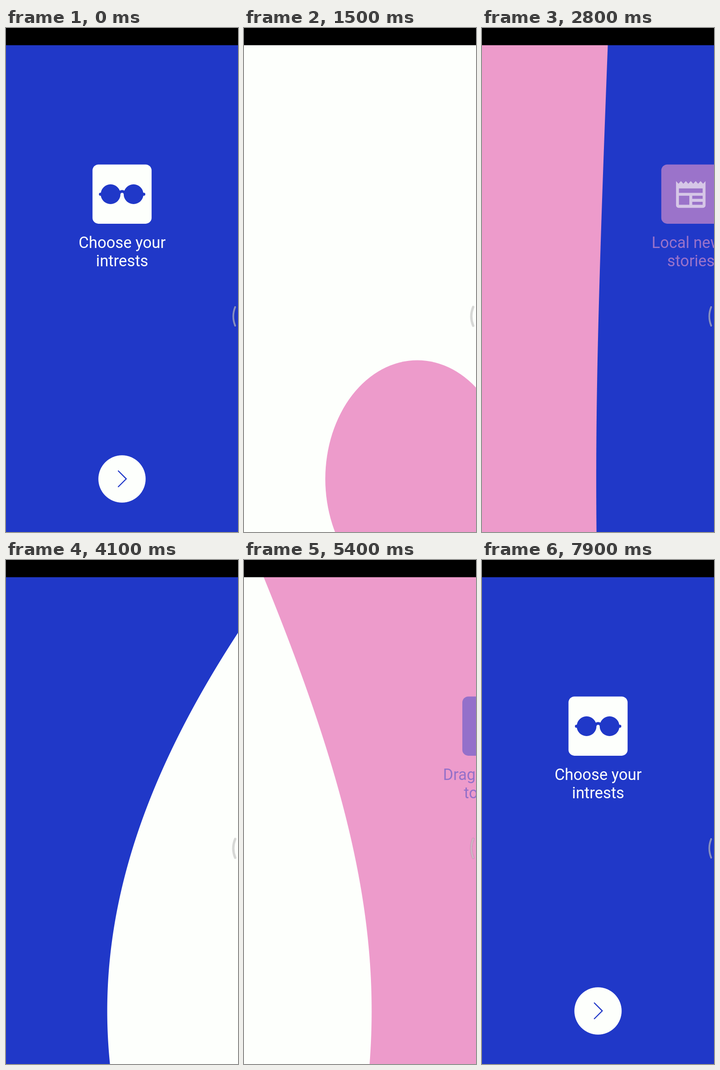
Write an HTML page with a canvas that moves like this. It is 508 px wide and 1102 px high and loops after 8000 ms.

```html
<!DOCTYPE html>
<html lang="en">
<head>
<meta charset="utf-8">
<title>Onboarding pages</title>
<style>
  html, body { margin: 0; width: 100%; height: 100%; overflow: hidden; background: #000; }
  canvas { display: block; }
</style>
</head>
<body>
<canvas id="stage" width="508" height="1102"></canvas>
<script>
const ctx = document.getElementById('stage').getContext('2d');
const W = 508, H = 1102, LOOP = 8000, STEP = 100;
const DP = 1.2937;                 // stage pixels per layout unit
const BUTTON = { x: 254, y: 986, r: 40 * DP };
const CAMERA = 200 * DP;           // perspective distance of the turning disc
const DISC_MS = 270, TEXT_MS = 216;

const BLUE = [32, 56, 200], WHITE = [253, 255, 252], PINK = [237, 155, 203];
const pages = [
  { bg: BLUE, lines: ['Choose your', 'intrests'], icon: glasses },
  { bg: WHITE, lines: ['Local news', 'stories'], icon: newspaper },
  { bg: PINK, lines: ['Drag and drop', 'to move'], icon: moveArrows },
];
const page = i => pages[i % 3];

// Start of the disc and of the text slide for each page change.
const changes = [
  [140, 150], [1402.5, 1412], [2666.4, 2678.4],
  [3978, 3988], [5255, 5260.7], [6367.5, 6383.1],
];

const clamp = v => Math.min(1, Math.max(0, v));
const rgb = c => `rgb(${c.map(Math.round)})`;
const mix = (a, b, k) => a.map((v, i) => v + (b[i] - v) * k);

// cubic-bezier(.42, 0, 1, 1)
function easeIn(x) {
  let lo = 0, hi = 1;
  for (let i = 0; i < 30; i++) {
    const u = (lo + hi) / 2, v = 1 - u;
    if (1.26 * v * v * u + 3 * v * u * u + u ** 3 < x) lo = u; else hi = u;
  }
  return lo * lo * (3 - 2 * lo);
}
function easeInOut(x) {
  if (x <= 0 || x >= 1) return clamp(x);
  return x < .5 ? easeIn(2 * x) / 2 : 1 - easeIn(2 - 2 * x) / 2;
}

// A disc that turns half a circle about its vertical axis while growing
// six times and back, seen in perspective: an ellipse, or a hyperbola close up.
function disc(p, color) {
  const angle = Math.PI * p, c = Math.cos(angle), n = Math.sin(angle);
  const a = BUTTON.r * (1 + 10 * Math.min(p, 1 - p));
  const q = 1 - (a * n / CAMERA) ** 2, m = a * a * n / CAMERA;
  ctx.fillStyle = color;
  ctx.beginPath();
  if (q > .1) {
    ctx.ellipse(BUTTON.x + c * m / q, BUTTON.y, Math.abs(a * c / q), a / Math.sqrt(q), 0, 0, 7);
  } else {
    const far = c > 0 ? W + 10 : -10;
    ctx.moveTo(far, H + 8);
    for (let y = H + 8; y >= 0; y -= 4) {
      const e = (y - BUTTON.y) ** 2 - a * a;
      ctx.lineTo(BUTTON.x + c * e / (m + Math.sqrt(Math.max(0, m * m - q * e))), y);
    }
    ctx.lineTo(far, 0);
  }
  ctx.fill();
}

function polyline(points) {
  points.forEach(([x, y], i) => i ? ctx.lineTo(x, y) : ctx.moveTo(x, y));
}

// Icons are drawn about the middle of the tile.
function glasses() {
  ctx.beginPath();
  for (const x of [-25, 25.3]) {
    ctx.moveTo(x, 0);
    ctx.arc(x, 0, 21.6, 0, 7);
  }
  ctx.roundRect(-50.5, -3.2, 9, 6.6, 3);
  ctx.roundRect(42, -3.2, 9, 6.6, 3);
  ctx.fill();
  ctx.lineWidth = 6;
  ctx.beginPath();
  ctx.moveTo(-6, -1);
  ctx.bezierCurveTo(-5, -8, 5.5, -8, 6.5, -1);
  ctx.stroke();
}

function newspaper() {
  ctx.beginPath();
  const teeth = [];
  for (let i = 0; i <= 12; i++) teeth.push([-32.3 + i * 5.38, i % 2 ? -23 : -28.6]);
  polyline(teeth);
  ctx.arcTo(32.3, 29.8, 0, 29.8, 5.5);
  ctx.arcTo(-32.3, 29.8, -32.3, 0, 5.5);
  ctx.closePath();
  ctx.rect(-26, -12.6, 52, 9.8);
  ctx.rect(-26, 3.4, 22.8, 19.6);
  ctx.rect(3.2, 3.4, 22.8, 6.6);
  ctx.rect(3.2, 16.6, 22.8, 6.4);
  ctx.fill('evenodd');
}

function moveArrows() {
  ctx.save();
  for (let i = 0; i < 4; i++) {
    ctx.beginPath();
    polyline([[0, -31], [11, -20], [3, -20], [3, 0], [-3, 0], [-3, -20], [-11, -20]]);
    ctx.fill();
    ctx.rotate(Math.PI / 2);
  }
  ctx.restore();
}

function card(i, x) {
  const { bg, lines, icon } = page(i), ink = rgb(page(i + 1).bg);
  ctx.fillStyle = ink;
  ctx.beginPath();
  ctx.roundRect(x - 64.6, 298.5, 129.4, 129.4, 13);
  ctx.fill();
  lines.forEach((line, k) => ctx.fillText(line, x + .3, 480.6 + 40.1 * k));
  ctx.save();
  ctx.translate(x, 363.4);
  ctx.fillStyle = ctx.strokeStyle = rgb(bg);
  icon();
  ctx.restore();
}

// Cards lie two widths apart and fade out halfway between each other.
function cards(slide) {
  ctx.font = '34.25px Roboto, sans-serif';
  ctx.textAlign = 'center';
  ctx.globalAlpha = Math.abs(1 - 2 * (slide % 1));
  pages.forEach((_, i) => {
    const x = W / 2 + (i - slide) * 2 * W;
    if (x > -120 && x < W + 120) card(i, x);
  });
  ctx.globalAlpha = 1;
}

function chevron(p, color) {
  ctx.globalAlpha = clamp(Math.max(1 - p / .05, (p - .9) / .1));
  ctx.strokeStyle = color;
  ctx.lineWidth = 2.4;
  ctx.lineCap = 'round';
  ctx.beginPath();
  polyline([[246, 968.5], [263.3, 985.8], [246, 1003]]);
  ctx.stroke();
  ctx.lineCap = 'butt';
  ctx.globalAlpha = 1;
}

function edgeHandle() {
  ctx.lineCap = 'round';
  for (const [width, color] of [[5.8, 'rgba(0,0,0,.1)'], [4, 'rgba(205,205,205,.6)']]) {
    ctx.lineWidth = width;
    ctx.strokeStyle = color;
    ctx.beginPath();
    ctx.moveTo(501.8, 610);
    ctx.quadraticCurveTo(493.6, 630.5, 501.8, 651);
    ctx.stroke();
  }
  ctx.lineCap = 'butt';
}

function draw(t) {
  const k = Math.max(0, changes.findLastIndex(([start]) => start <= t));
  const [discStart, textStart] = changes[k];
  const p = easeInOut((t - discStart) / DISC_MS);
  const q = easeInOut((t - textStart) / TEXT_MS);
  const from = page(k).bg, to = page(k + 1).bg, next = page(k + 2).bg;
  const late = p > .5;

  ctx.fillStyle = rgb(late ? to : from);
  ctx.fillRect(0, 0, W, H);
  disc(p, rgb(late ? mix(from, next, clamp((p - .9) / .1)) : to));
  chevron(p, rgb(late ? to : from));
  cards(k % 3 + ((k + 1) % 3 - k % 3) * q);
  edgeHandle();
  ctx.fillStyle = '#000';
  ctx.fillRect(0, 0, W, 37.6);
}

const begin = performance.now();
function tick() {
  const t = (performance.now() - begin) % LOOP;
  draw(Math.floor(t / STEP) * STEP);
  requestAnimationFrame(tick);
}
tick();
</script>
</body>
</html>
```
